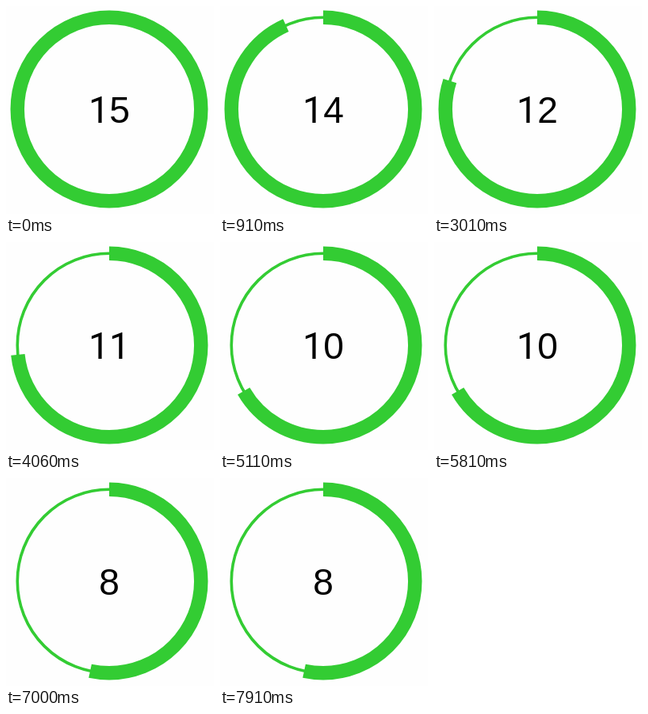
An HTML page that plays this animation: 260x260 px, repeating every 8000 ms.

```html
<!DOCTYPE html>
<html lang="en">
<head>
<meta charset="utf-8">
<title>Countdown</title>
<style>
  html, body { margin: 0; width: 100%; height: 100%; overflow: hidden; background: #fefefe; }
  svg { display: block; width: 100%; height: 100%; }
  circle { fill: none; stroke: #33cc33; }
  text { font: 46px "Liberation Sans", Arial, sans-serif; text-anchor: middle; fill: #000; }
  /* a "1" without a foot */
  .one { font-family: Roboto, sans-serif; }
</style>
</head>
<body>
<svg viewBox="0 0 260 260">
  <circle cx="129" cy="129" r="114.75" stroke-width="3.6"/>
  <circle id="ring" cx="129" cy="129" r="114.75" stroke-width="17.4" pathLength="15" transform="rotate(-90 129 129)"/>
  <text id="label" x="129" y="146"></text>
</svg>
<script>
  const LOOP = 8000, START = 15, FIRST_TICK = 700, TICK = 1050;
  const ring = document.getElementById('ring');
  const label = document.getElementById('label');
  let shown;

  function show(count) {
    if (count === shown) return;
    shown = count;
    ring.setAttribute('stroke-dasharray', count === START ? 'none' : `${count} ${START}`);
    label.innerHTML = String(count).replace(/1/g, '<tspan class="one">1</tspan>');
  }

  function frame() {
    const time = performance.now() % LOOP;
    show(START - Math.floor((time - FIRST_TICK) / TICK + 1));
    requestAnimationFrame(frame);
  }
  frame();
</script>
</body>
</html>
```
